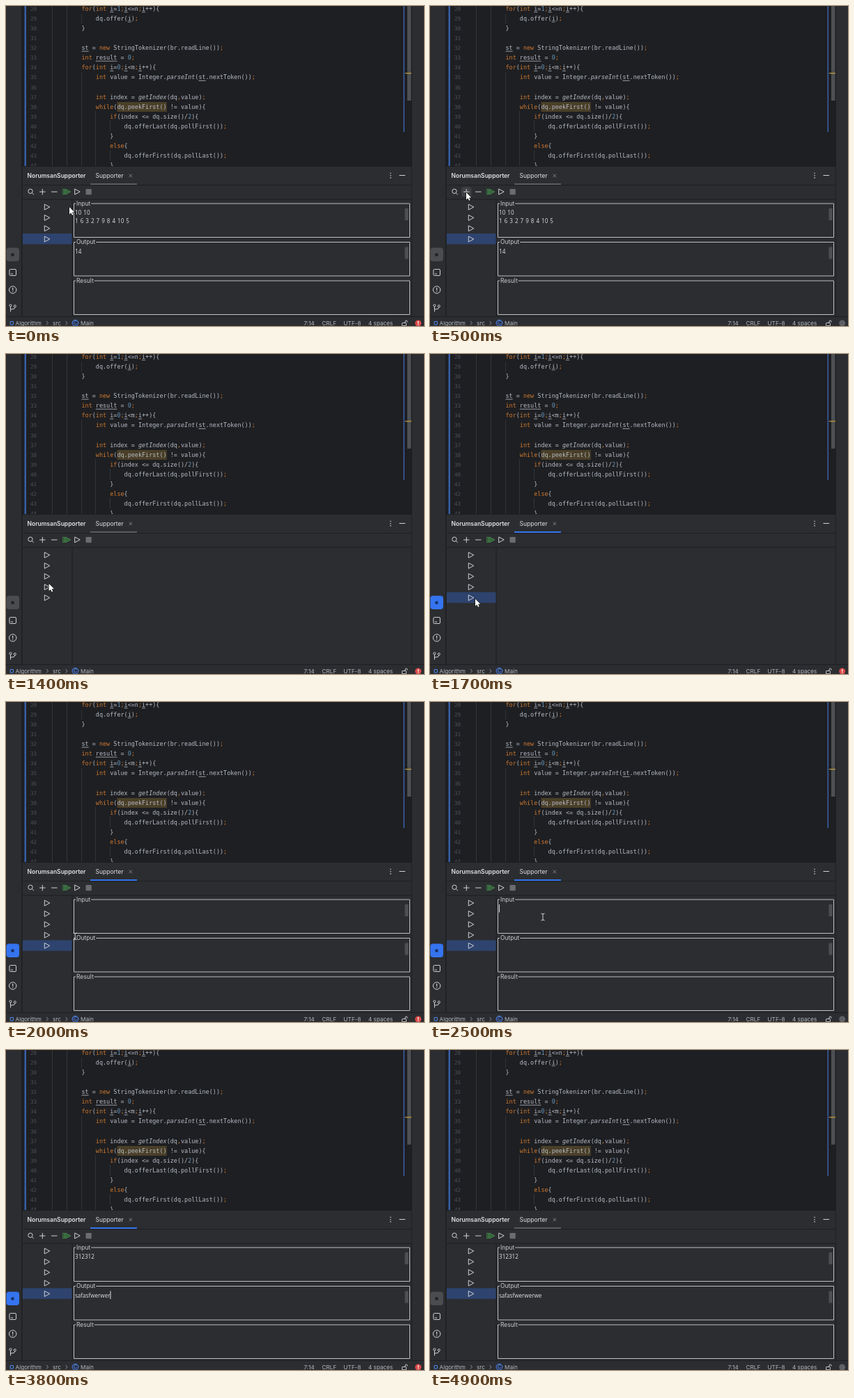
Write an HTML page with a canvas that moves like this. It is 600 px wide and 460 px high and loops after 5000 ms.

```html
<!DOCTYPE html>
<html lang="en">
<head>
<meta charset="utf-8">
<title>Adding test data</title>
<style>
html, body { margin: 0; width: 100%; height: 100%; overflow: hidden; background: #2b2d30; }
canvas { display: block; width: 600px; height: 460px; }
</style>
</head>
<body>
<canvas id="stage" width="600" height="460"></canvas>
<script>
const ctx = document.getElementById('stage').getContext('2d');
const LOOP = 5000, STEP = 100;

const UI = 'Inter, sans-serif';
const MONO = '8.46px "DejaVu Sans Mono", monospace';
const AREA = '8.1px "Open Sans", sans-serif';
const C = {
  editor: '#1e1f22', panel: '#2b2d30', line: '#1e1f22', text: '#dfe1e5', icon: '#ced0d6',
  code: '#b4bac4', keyword: '#cc7832', number: '#6897bb', gutter: '#4b5059', guide: '#313438',
  blue: '#3574f0', row: '#2e436e', thumb: '#4d4f52', border: '#bcbec2'
};

const FIRST_LINE = 28, PITCH = 14.07, CODE_X = 108.5;
const CODE = [
  'for(int i=1;i<=n;i++){',
  '    dq.offer(i);',
  '}',
  '',
  'st = new StringTokenizer(br.readLine());',
  'int result = 0;',
  'for(int i=0;i<m;i++){',
  '    int value = Integer.parseInt(st.nextToken());',
  '',
  '    int index = getIndex(dq,value);',
  '    while(dq.peekFirst() != value){',
  '        if(index <= dq.size()/2){',
  '            dq.offerLast(dq.pollFirst());',
  '        }',
  '        else{',
  '            dq.offerFirst(dq.pollLast());',
  '        }'
];
const KEYWORD = /^(for|int|new|while|if|else|[;,])$/;
const STATIC = /^(parseInt|getIndex)$/;
const MUTATED = /^(i|st|result)$/;

// Pointer path: time, x, y
const PATH = [
  [0, 91, 289], [100, 88, 287], [500, 52, 268], [1200, 52, 268], [1500, 65, 352],
  [1800, 65, 352], [2300, 162, 309], [2800, 162, 309], [3100, 143, 364]
];
const INPUT = '312312', OUTPUT = 'safasfwerwerwe';

function rect(x, y, w, h, color) {
  ctx.fillStyle = color;
  ctx.fillRect(x, y, w, h);
}

function rounded(x, y, w, h, r, fill, stroke) {
  ctx.beginPath();
  ctx.roundRect(x, y, w, h, r);
  if (fill) { ctx.fillStyle = fill; ctx.fill(); }
  if (stroke) { ctx.strokeStyle = stroke; ctx.lineWidth = 1; ctx.stroke(); }
}

function text(str, x, y, font, color) {
  ctx.font = font;
  ctx.fillStyle = color;
  ctx.fillText(str, x, y);
}

const label = (str, x, y, color = C.text, size = 8.5, weight = 400) =>
  text(str, x, y, `${weight} ${size}px ${UI}`, color);

function trace(points, closed) {
  ctx.beginPath();
  points.forEach(([x, y], i) => i ? ctx.lineTo(x, y) : ctx.moveTo(x, y));
  if (closed) ctx.closePath();
}

function stroke(points, color = C.icon, width = 1, closed = false) {
  trace(points, closed);
  ctx.strokeStyle = color;
  ctx.lineWidth = width;
  ctx.stroke();
}

function circle(x, y, r, fill, line) {
  ctx.beginPath();
  ctx.arc(x, y, r, 0, Math.PI * 2);
  if (fill) { ctx.fillStyle = fill; ctx.fill(); }
  if (line) { ctx.strokeStyle = line; ctx.lineWidth = 1; ctx.stroke(); }
}

function play(x, y, color = C.icon, fill) {
  const shape = [[x, y - 4], [x + 7.5, y], [x, y + 4]];
  ctx.lineJoin = 'round';
  stroke(shape, color, 1, true);
  if (fill) { ctx.fillStyle = fill; ctx.fill(); }
}

function codeLine(str, y, advance) {
  let col = 0;
  for (const token of str.match(/\w+|\s+|[^\w\s]/g) || []) {
    const x = CODE_X + col * advance;
    const color = KEYWORD.test(token) ? C.keyword : /^\d/.test(token) ? C.number : C.code;
    text(token, x, y + 3, (STATIC.test(token) ? 'italic ' : '') + MONO, color);
    if (MUTATED.test(token)) rect(x, y + 4.4, token.length * advance, 0.8, C.code);
    col += token.length;
  }
}

function editor() {
  ctx.save();
  ctx.beginPath();
  ctx.rect(22, 0, 560, 230);
  ctx.clip();
  rect(22, 0, 560, 230, C.editor);
  rect(26.5, 0, 2.5, 230, '#375fa5');
  for (const [x, top, bottom] of [[66, 0, 230], [87, 0, 230], [108, 11, 25], [108, 95, 230],
    [128, 151, 230], [149, 165, 180], [149, 207, 222]]) rect(x, top, 1, bottom - top, C.guide);

  ctx.font = MONO;
  const advance = ctx.measureText('0').width;
  rect(159.5, 138, advance * 14, 14, '#4a3f28');
  CODE.forEach((str, i) => {
    const y = 4 + i * PITCH;
    text(FIRST_LINE + i, 35, y + 3, '7.6px "DejaVu Sans Mono", monospace', C.gutter);
    codeLine(str, y, advance);
  });
  rect(570.5, 0, 1.5, 181, '#375fa5');
  rect(576, 0, 5.5, 136, C.thumb);
  rect(573, 96, 9, 1.3, '#b89a3c');
  ctx.restore();
}

function sidebar(focused) {
  rounded(0.5, 347.5, 18.5, 19.5, 4, focused ? C.blue : '#4a4c50');
  rect(7.5, 355.5, 4, 4, focused ? '#16305f' : '#1e1f22');
  rounded(5, 378.5, 9.5, 9, 1.5, null, C.icon);
  stroke([[7, 385], [10, 385]]);
  circle(9.7, 408, 5.2, null, C.icon);
  rect(9.1, 404.8, 1.2, 4, C.icon);
  rect(9.1, 410, 1.2, 1.2, C.icon);
  circle(6.5, 430.5, 1.6, null, C.icon);
  circle(12.8, 431.5, 1.6, null, C.icon);
  stroke([[6.5, 432], [6.5, 439.5]]);
  stroke([[12.8, 433], [11.5, 435.5], [6.5, 436]]);
}

function header(focused) {
  rect(22, 230, 561, 1, C.line);
  label('NorumsanSupporter', 30.5, 247, C.text, 8.5, 600);
  label('Supporter', 128.5, 247);
  stroke([[176.5, 241.7], [181, 246.2]], '#868a91', 0.9);
  stroke([[181, 241.7], [176.5, 246.2]], '#868a91', 0.9);
  rect(24, 257, 558, 1, C.line);
  rect(121, 255, 67, 2, focused ? C.blue : '#5a5d63');
  for (const y of [240.5, 243.7, 246.9]) circle(552, y, 0.8, C.icon);
  rect(564.5, 243, 8.5, 1, C.icon);
}

function toolbar(hover) {
  if (hover) rounded(45, 260, 14.5, 14.5, 3, '#3d3f43');
  circle(35, 266.3, 3.2, null, C.icon);
  stroke([[37.3, 268.6], [39.8, 271.2]]);
  rect(48, 266.6, 8.5, 1, C.icon);
  rect(51.8, 263, 1, 8.4, C.icon);
  rect(65, 266.6, 8.5, 1, C.icon);
  play(82, 267, '#57a65c', '#2f5a36');
  play(85, 267, '#57a65c', '#35663c');
  play(98.7, 267);
  rounded(114.5, 263, 8.3, 8.3, 1, '#6a6c70');
  rect(24, 277.5, 558, 1, C.line);
}

function list(count, selected) {
  rect(94.5, 278, 1, 168, C.line);
  if (selected) rect(24, 327 + (selected - 4) * 15.4, 70.5, 15.4, C.row);
  for (let i = 0; i < count; i++) play(55.3, 289 + i * 15.35);
}

function group(title, y, lines, caret) {
  const x = 97.5;
  ctx.font = `8.5px ${UI}`;
  const end = 101 + ctx.measureText(title).width + 1;
  stroke([[100, y], [x, y], [x, y + 48.5], [579.5, y + 48.5], [579.5, y], [end, y]], C.border);
  label(title, 101, y + 2.6, '#c8cacf');
  ctx.wordSpacing = '0.9px';
  lines.forEach((str, i) => text(str, 99, y + 16 + i * 12.4, AREA, C.text));
  if (caret) {
    ctx.font = AREA;
    rect(99 + ctx.measureText(lines[0]).width, y + 7, 1, 11.5, C.text);
  }
  ctx.wordSpacing = '0px';
  if (title !== 'Result') rect(572.5, y + 7, 5, 17, C.thumb);
}

function statusBar(alert) {
  const word = (str, x) => label(str, x, 458.8, '#b4b8bf', 8.2);
  const chevron = x => stroke([[x, 453], [x + 2.5, 455.7], [x, 458.4]], '#8b8f97');
  rect(0, 446, 600, 1, C.line);
  rounded(6, 453.5, 4.5, 4.5, 0.5, null, '#548af7');
  word('Algorithm', 13.5);
  chevron(58);
  word('src', 67);
  chevron(85.5);
  circle(99.5, 455.7, 4.4, '#25324d', '#548af7');
  label('C', 96.9, 458.4, '#6d9bf8', 7);
  word('Main', 107);
  word('7:14', 427.5);
  word('CRLF', 453.5);
  word('UTF-8', 484.5);
  word('4 spaces', 520);
  rounded(568.5, 455.5, 6, 4.2, 0.8, null, C.icon);
  stroke([[573, 455], [573, 453], [574.5, 452], [576, 453], [576, 454.5]]);
  circle(591.7, 456, 4.5, alert ? '#db4b4b' : '#5f6166');
  if (alert) {
    rect(591.1, 453, 1.2, 3.7, '#fff');
    rect(591.1, 457.6, 1.2, 1.2, '#fff');
  }
}

function tooltip() {
  rounded(59.5, 278.5, 70.5, 21.5, 2.5, '#393b40', '#43454a');
  label('Add test data', 67.5, 291.8);
}

function pointerAt(t) {
  const i = PATH.findIndex(p => p[0] > t);
  if (i < 0) return PATH[PATH.length - 1].slice(1);
  const [t0, x0, y0] = PATH[i - 1], [t1, x1, y1] = PATH[i];
  const k = (t - t0) / (t1 - t0), e = k * k * (3 - 2 * k);
  return [x0 + (x1 - x0) * e, y0 + (y1 - y0) * e];
}

function pointer(t) {
  if (t >= 3500) return;
  const [x, y] = pointerAt(t);
  if (t >= 1800 && x > 98) {
    stroke([[x - 2.5, y - 5], [x, y - 4.2], [x + 2.5, y - 5]], C.text, 0.9);
    stroke([[x, y - 4.5], [x, y + 4.5]], C.text, 0.9);
    stroke([[x - 2.5, y + 5], [x, y + 4.2], [x + 2.5, y + 5]], C.text, 0.9);
    return;
  }
  trace([[0, 0], [0, 10.5], [2.4, 8.3], [4, 11.8], [5.7, 11], [4.1, 7.6], [7.4, 7.4]]
    .map(([dx, dy]) => [x + dx, y + dy]), true);
  ctx.strokeStyle = '#111';
  ctx.lineWidth = 1.2;
  ctx.stroke();
  ctx.fillStyle = '#fff';
  ctx.fill();
}

function typed(str, t, start, rate) {
  return str.slice(0, Math.max(0, Math.floor((t - start) / 100 * rate + 0.01)));
}

function draw(t) {
  const added = t >= 1200, picked = t >= 1600, fresh = t >= 1800;
  const focused = picked && t < 4900;
  const alert = Math.floor((t + 800) / 1000) % 2 === 0;
  const out = t <= 3300 ? typed(OUTPUT, t, 3000, 1) : typed(OUTPUT, t, 3300 - 500 / 3, 1.8);

  rect(0, 0, 600, 460, C.panel);
  rect(22, 0, 1.5, 446, C.line);
  rect(582, 0, 1, 446, C.line);
  editor();
  sidebar(focused);
  header(focused);
  toolbar(t >= 400 && t < 1300);
  list(added ? 5 : 4, picked ? 5 : added ? 0 : 4);
  if (!added || fresh) {
    const input = fresh ? [typed(INPUT, t, 2500, 1.5)] : ['10 10', '1 6 3 2 7 9 8 4 10 5'];
    const blink = t < 4200 || t >= 4700;
    group('Input', 284, input, t >= 2400 && t < 3100);
    group('Output', 339.5, [fresh ? out : '14'], t >= 3100 && focused && blink);
    group('Result', 395, []);
  }
  statusBar(alert);
  if (t >= 800 && t < 1200) tooltip();
  pointer(t);
}

const start = performance.now();
function tick() {
  const t = (performance.now() - start) % LOOP;
  draw(Math.floor(t / STEP) * STEP);
  requestAnimationFrame(tick);
}
tick();
</script>
</body>
</html>
```
